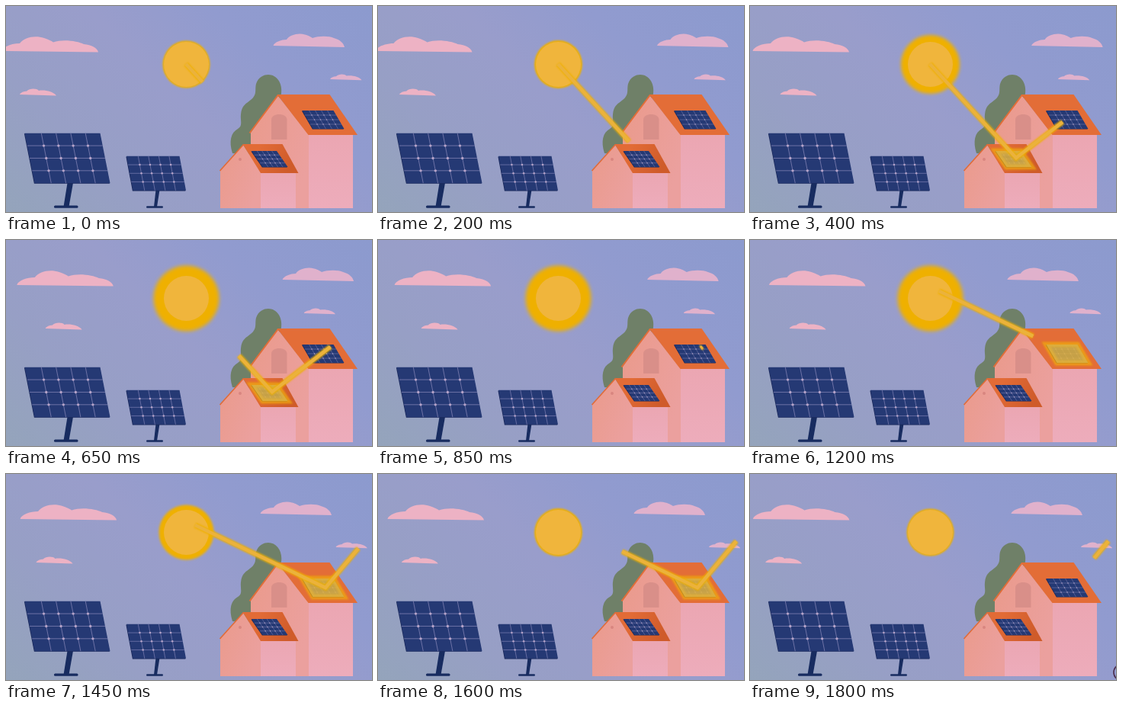
An HTML page for the animation above (1850 ms loop, 480 px wide and 270 px high).

```html
<!DOCTYPE html>
<html lang="en">
<head>
<meta charset="utf-8">
<title>Solar roofs</title>
<style>
html, body { margin: 0; width: 100%; height: 100%; overflow: hidden; background: #979dcb; }
svg { display: block; width: 100vw; height: 100vh; }
.near { fill: #edb2c4; }
.far { fill: #e0b1cc; }
.beam { fill: none; }
</style>
</head>
<body>
<svg viewBox="0 0 480 270">
  <defs>
    <linearGradient id="sky" gradientUnits="userSpaceOnUse" x1="52" y1="322" x2="427" y2="-53">
      <stop offset="0" stop-color="#94a4bb"/>
      <stop offset=".24" stop-color="#979fc5"/>
      <stop offset=".5" stop-color="#999dcb"/>
      <stop offset=".72" stop-color="#919bcf"/>
      <stop offset="1" stop-color="#8c9ace"/>
    </linearGradient>
    <linearGradient id="front" x2="1" y2=".6">
      <stop offset="0" stop-color="#ea9a8b"/>
      <stop offset="1" stop-color="#eba09e"/>
    </linearGradient>
    <linearGradient id="side" x2="0" y2="1">
      <stop offset="0" stop-color="#eba6b2"/>
      <stop offset="1" stop-color="#edacbb"/>
    </linearGradient>
    <linearGradient id="lowTiles" x2="1" y2=".3">
      <stop offset=".3" stop-color="#e26b36"/>
      <stop offset="1" stop-color="#cf5b2a"/>
    </linearGradient>
    <filter id="soft" filterUnits="userSpaceOnUse" x="0" y="0" width="480" height="270">
      <feGaussianBlur stdDeviation="1"/>
    </filter>
    <filter id="haze" filterUnits="userSpaceOnUse" x="170" y="10" width="134" height="134">
      <feGaussianBlur id="hazeBlur"/>
    </filter>
    <path id="puff" d="M0 7.5C1 4.5 6 3.3 9 3.2C13-.8 22-.8 25 2.4C33 1.2 44 3.5 48 9Z"/>
  </defs>

  <rect width="480" height="270" fill="url(#sky)"/>

  <path id="bigLeft" class="near" d="M-5.500 59C-4 53 8 49 18 49C24 41 38 38 50 42C56 44 60 46 62 47.500C75 43 94 46 102 50C112 51 120 55 121 60.500Z"/>
  <path id="bigRight" class="far" d="M350.500 52C352 47 362 44 368 44C372 38 383 35 392 37.500C398 39 400 41 402 42C410 39 424 39 430 42C438 44 443 49 444 54Z"/>
  <g id="smallLeft" class="near"><use href="#puff" x="18" y="108.500"/></g>
  <g id="smallRight" class="far"><use href="#puff" transform="translate(425 89.500) scale(.86)"/></g>

  <circle id="halo" cx="236.500" cy="76.500" fill="#efb000" filter="url(#haze)"/>
  <circle cx="236.500" cy="76.500" r="29.500" fill="#f0b53c"/>

  <path fill="#6f8068" d="M297 193C292 177 295 166 304 161C311 157 307 150 308 142C309 130 315 128 321 123C330 116 326 109 328 102C331 93 338 90 344 90C355 90 363 101 361 115L350 150L322 195Z"/>

  <g id="bigHouse">
    <path d="M356 117L397 168V265H321V166Z" fill="url(#front)"/>
    <path d="M397 167H455V265H397Z" fill="url(#side)"/>
    <path d="M355.500 116H424.500L461 169H396.500Z" fill="#e36d37"/>
    <path d="M357 116.500L319.500 166.500" stroke="#e36d37" stroke-width="2"/>
    <path d="M348 175V149C348 139.500 368.500 139.500 368.500 149V175Z" fill="#d98f89"/>
  </g>
  <g id="smallHouse">
    <path d="M311 182L334 218V265H281V216Z" fill="url(#front)"/>
    <path d="M334 217H380V265H334Z" fill="url(#side)"/>
    <path d="M310.500 181H362.500L383.500 219H334Z" fill="url(#lowTiles)"/>
    <path d="M311.500 181.500L280.500 216" stroke="#e26b36" stroke-width="1.600"/>
    <circle cx="307" cy="201" r="2" fill="#d98680"/>
  </g>

  <g fill="#182c60">
    <path d="M80.500 232H88L82.500 263H75.500Z"/>
    <rect x="63" y="261.500" width="31.500" height="3.300" rx="1.500"/>
    <path d="M196.500 241H201.500L198 263H194Z"/>
    <rect x="184" y="262.200" width="22" height="2.600" rx="1.300"/>
  </g>
  <g id="panels"></g>
  <g id="beams"></g>
  <circle id="ring" cx="488" cy="260" r="11" fill="none" stroke="#4b2c4c" stroke-width="1.600"/>
</svg>
<script>
const LOOP = 1850, STEP = 50;
const COLS = 5, ROWS = 4;
const byId = id => document.getElementById(id);

function add(parent, tag, attrs) {
  const el = document.createElementNS('http://www.w3.org/2000/svg', tag);
  for (const key in attrs) el.setAttribute(key, attrs[key]);
  parent.append(el);
  return el;
}

// A sheared board: top left corner, width, height, lean to the right.
const board = (x, y, w, h, lean) => (u, v) => [x + w * u + lean * v, y + h * v];
const outline = at => [at(0, 0), at(1, 0), at(1, 1), at(0, 1)].join(' ');

function panel(at, line, dot) {
  const root = byId('panels');
  const col = i => .025 + .975 * i / COLS;
  add(root, 'polygon', { points: outline(at), fill: '#182657', transform: 'translate(-.6 .6)' });
  add(root, 'polygon', { points: outline(at), fill: '#253974' });
  let grid = '';
  for (let i = 1; i < COLS; i++) grid += `M${at(col(i), 0)}L${at(col(i), 1)}`;
  for (let j = 1; j < ROWS; j++) grid += `M${at(0, j / ROWS)}L${at(1, j / ROWS)}`;
  add(root, 'path', { d: grid, fill: 'none', stroke: '#7f80b3', 'stroke-width': line });
  for (let i = 1; i < COLS; i++) for (let j = 1; j < ROWS; j++) {
    const [cx, cy] = at(col(i), j / ROWS);
    add(root, 'circle', { cx, cy, r: dot, fill: '#b6a4c9' });
  }
}

function flare(at) {
  const root = add(byId('panels'), 'g', {});
  const points = outline(at);
  add(root, 'polygon', {
    points, fill: 'none', stroke: '#efa80c', 'stroke-width': 7, opacity: .75, filter: 'url(#soft)'
  });
  add(root, 'polygon', { points, fill: '#e2b340', opacity: .85 });
  return root;
}

// Returns a function that shows the part of the path between two distances.
function beam(points) {
  const root = add(byId('beams'), 'g', { class: 'beam' });
  const lines = [
    add(root, 'polyline', { points, stroke: '#efb000', 'stroke-width': 7, opacity: .9, filter: 'url(#soft)' }),
    add(root, 'polyline', { points, stroke: '#ebb23b', 'stroke-width': 4.5 })
  ];
  const length = lines[0].getTotalLength();
  return (from, to) => {
    const tail = clamp(from, 0, length), head = clamp(to, 0, length);
    root.style.display = head > tail ? '' : 'none';
    for (const el of lines) {
      el.setAttribute('stroke-dasharray', `${head - tail} 999`);
      el.setAttribute('stroke-dashoffset', -tail);
    }
  };
}

const clamp = (v, lo, hi) => Math.min(hi, Math.max(lo, v));
const ramp = (t, from, to) => clamp((t - from) / (to - from), 0, 1);
const ease = (t, from, to) => { const u = ramp(t, from, to); return u * u * (3 - 2 * u); };
const pulse = (t, on, off) => Math.min(ramp(t, on, on + 100), 1 - ramp(t, off - 100, off));
const wave = deg => Math.cos(deg * Math.PI / 180);

const lowRoof = board(322, 190, 33, 21, 14.5);
const highRoof = board(388.5, 137, 41, 24, 14);
panel(board(24.5, 166.7, 99, 65.5, 13), .8, 1.7);
panel(board(158, 196.8, 69.5, 45, 8.5), .7, 1.3);
panel(lowRoof, .5, .7);
panel(highRoof, .5, .7);
const lowFlare = flare(lowRoof), highFlare = flare(highRoof);
const firstBeam = beam('236,76 349,199 425.5,140');
const secondBeam = beam('248,67 419,149 470,88');

const drift = {
  bigLeft: t => 15.5 * (1 - wave(t * .163)),
  bigRight: t => t < 330 ? 19 * wave(90 - t * 90 / 330) : 1 + 18 * wave((t - 330) * .163),
  smallLeft: t => 16 + 23 * wave((t - 925) * .145),
  smallRight: t => Math.min(9, .053 * Math.abs(t - 655) - 34.5)
};

function draw(t) {
  for (const id in drift) byId(id).setAttribute('transform', `translate(${drift[id](t)} 0)`);

  const glow = Math.min(ease(t, 150, 575), 1 - ease(t, 1200, 1650));
  byId('halo').setAttribute('r', 31 + 12 * glow);
  byId('hazeBlur').setAttribute('stdDeviation', .9 + 1.9 * glow);

  firstBeam((t - 520) * .79, 32 + t * .53);
  secondBeam((t - 1500) * .8, (t - 915) * .48);
  lowFlare.style.opacity = pulse(t, 200, 800);
  highFlare.style.opacity = pulse(t, 1050, 1790);
  byId('ring').style.display = t >= 1800 ? '' : 'none';
}

function tick() {
  draw(Math.floor(performance.now() % LOOP / STEP) * STEP);
  requestAnimationFrame(tick);
}
tick();
</script>
</body>
</html>
```
